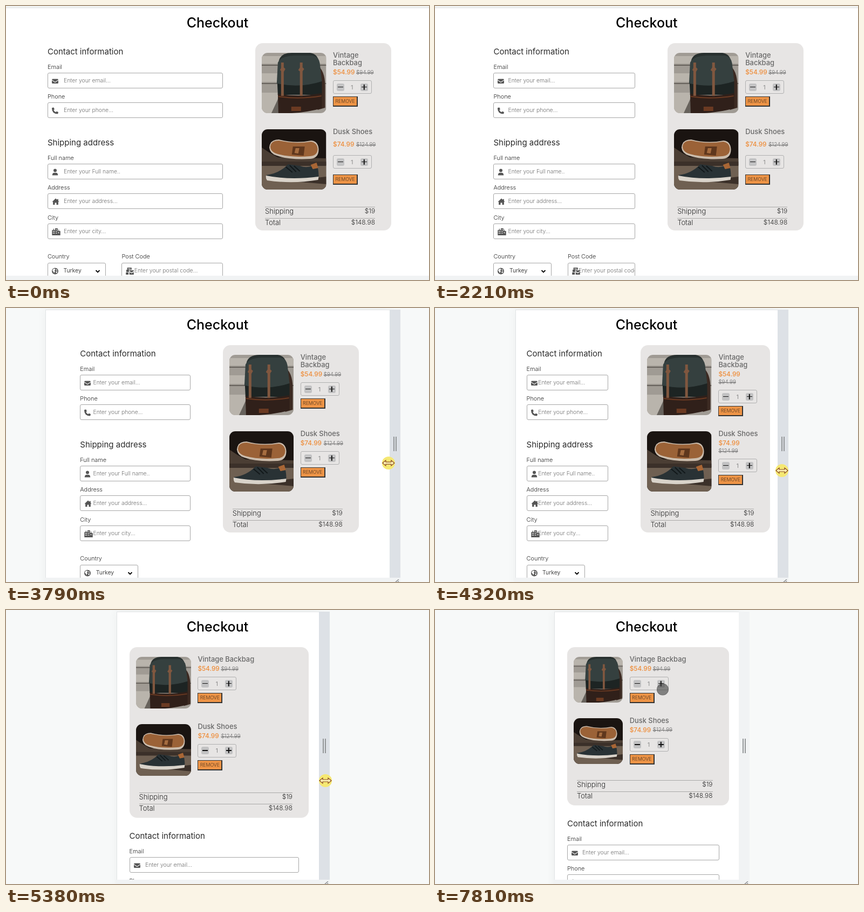
An HTML page that plays this animation: 784 by 509 pixels, repeating every 8000 ms.

```html
<!DOCTYPE html>
<html lang="en">
<head>
<meta charset="utf-8">
<title>Checkout</title>
<style>
html, body { margin: 0; width: 100%; height: 100%; overflow: hidden; }
body { background: #f7f9f9; font-family: Inter, "Open Sans", sans-serif; color: #2a2a2a; }
#stage { position: relative; width: 784px; height: 509px; overflow: hidden; background: #f7f9f9; }
#stage div, #stage svg { position: absolute; box-sizing: border-box; }
.t { white-space: nowrap; line-height: 20px; height: 20px; margin-top: -10px; }

#page { left: var(--l); width: var(--w); top: 3px; height: 520px; background: #fff;
  border: solid #e1e4e5; border-width: 1px 0 0 1px; box-shadow: 0 0 16px rgba(60,70,70,.06); }
#title { left: calc(var(--cx) - 100px); top: 30.5px; width: 200px; text-align: center;
  font-size: 25px; font-weight: 450; color: #000; }

#form { left: var(--fx); top: var(--fy); width: var(--fw); height: 0; }
.head { font-size: 15px; font-weight: 400; }
.label { font-size: 10.9px; font-weight: 350; }
.input { height: 29px; border: 1px solid #a6a6a6; border-radius: 3px; background: #fff; overflow: hidden; }
.input svg { left: 7px; top: 8px; fill: #555; }
.hint { left: calc(13.4px + 4.84%); top: 14px; font-size: 10.4px; font-weight: 300; color: #707070; }
.hint.value { left: 28.5px; font-weight: 400; color: #444; }
.wrapped .post { display: none; }

#card { left: var(--kx); top: 69px; width: var(--kw); height: var(--kh); background: #e7e5e4; border-radius: 14px; }
.item { left: 12px; top: 0; }
.item svg.photo { left: 0; top: 18px; width: var(--iw); height: var(--ih); border-radius: 11px; }
.info { left: calc(var(--iw) + 12.5px); top: 0; }
.name { top: 23px; font-size: 12.9px; font-weight: 450; color: #686868; }
.name.two { display: none; top: 37px; }
.price { top: calc(40px + var(--a)); font-size: 11.8px; font-weight: 450; color: #ee8d3a; }
.old { left: var(--ox); top: calc(40.8px + var(--a) + var(--o)); font-size: 9.8px; font-weight: 350; color: #6b6b6b; text-decoration: line-through; }
.qty { top: calc(55px + var(--a) + var(--o) + var(--b)); width: 72px; height: 25px; border: 1px solid #b0b0b0; border-radius: 3px; }
.qty .t { left: 32px; top: 11.5px; font-size: 11px; color: #8a8a8a; }
.btn { top: 4.5px; width: 14px; height: 14px; border-radius: 3px; background: #c2c2c3; }
.btn::before, .btn.plus::after { content: ""; position: absolute; left: 2px; top: 6.2px; width: 10px; height: 1.6px; background: #111; }
.btn.plus::after { transform: rotate(90deg); }
.remove { top: calc(85px + var(--a) + var(--o) + var(--c)); width: 46px; height: 19px; background: #ee9446; color: #4a3320;
  border: solid #333; border-width: 1px 2px 2px 1px; font-size: 8.8px; font-weight: 350; line-height: 16px; text-align: center; }
.sum { left: 18px; right: 30px; height: 20px; border-top: 1px solid #a9a8a7; }
.sum .t { top: 7px; font-size: 13px; font-weight: 350; }
.sum .t + .t { right: 0; font-size: 11.9px; }

#bar { left: var(--r); top: 3px; width: 20px; height: 499px; background: #dde1e6; }
#bar.idle { background: #f1f3f4; }
#bar::before { content: ""; position: absolute; left: 7px; top: 236px; width: 2px; height: 27px;
  border: solid #949799; border-width: 0 2px; }
#foot { left: var(--l); top: 501px; width: calc(var(--w) + 20px); height: 8px; background: #f1f3f4; }
#foot svg { right: 2px; top: 3px; }
#cursor { left: 0; top: 0; width: 24px; height: 24px; margin: -12px; border-radius: 50%; background: #f5e873; }
#cursor.press { background: #f6c988; }
#cursor.touch { width: 22px; height: 22px; margin: -11px; background: rgba(62,62,62,.6); box-shadow: inset 0 0 0 1px rgba(70,70,70,.25); }
#cursor.touch svg { display: none; }
</style>
</head>
<body>
<svg width="0" height="0" style="position:absolute">
  <symbol id="mail" viewBox="0 0 16 16"><path d="M2 2.5h12q2 0 2 2L8 10 0 4.500q0-2 2-2zM0 6.200l8 5.500 8-5.500V12q0 2-2 2H2q-2 0-2-2z"/></symbol>
  <symbol id="phone" viewBox="0 0 16 16"><path d="M1 .8 4.600 0 6.500 4.500 4.300 6.300q1.800 3.600 5.400 5.400l1.800-2.200L16 11.400 15.200 15q-.2 1-1.200 1Q0 15.500 0 2q0-1 1-1.200z"/></symbol>
  <symbol id="user" viewBox="0 0 16 16"><circle cx="8" cy="4" r="4"/><path d="M1 16q0-6.500 5-6.500h4q5 0 5 6.500z"/></symbol>
  <symbol id="home" viewBox="0 0 16 16"><path d="M8 .5 11.500 3.700V2H14v4l2 2.200h-2V15H9.800v-4.500H6.200V15H2V8.200H0z"/></symbol>
  <symbol id="city" viewBox="0 0 19 16"><path fill-rule="evenodd" d="M0 4h3V1h1.500v3H7V0h6v6h1.500V3H16v3h3v10H0zM2 6v2h2V6zm0 4v2h2v-2zm3-4v2h1.500V6zm0 4v2h1.500v-2zM9 2v2h2V2zm0 4v2h2V6zm0 4v2h2v-2zm5-1v2h2V9z"/></symbol>
  <symbol id="globe" viewBox="0 0 16 16"><circle cx="8" cy="8" r="8"/><path fill="#fff" d="M3 3l4-1.500L9 4 6.500 6 8 8.500 6 11v3L3.500 9 1.500 7zM11 3l3 3-2 1-2-2zM10 9l4-.5-2 4.500-2-1z"/></symbol>
  <symbol id="bulk" viewBox="0 0 18 16"><path fill-rule="evenodd" d="M3 0h10v5H7v5H1V5h2zM5 2v1.500h6V2zM8 6h10v2l-5 3-5-3zm0 4 5 3 5-3v6H8zM0 11h6v5H0z"/></symbol>
  <symbol id="bag" viewBox="0 0 120 112" preserveAspectRatio="none">
    <path fill="#a09b94" d="M0 0h120v112H0z"/>
    <path fill="#b9b4ac" d="M0 6h120v14H0zM0 38h36v16H0zM0 74h32l-8 38H0z"/>
    <path fill="#67625c" d="M0 22h120v2H0zM0 56h120v2H0zM18 112l14-30v30z"/>
    <path fill="#3c2a22" d="M102 22q16 10 16 40v40l-14 4z"/>
    <path fill="#28302f" d="M32 14Q36 0 56 0h34q14 2 16 16l5 62H30z"/>
    <path fill="#35403f" d="M30 18Q36 6 60 5l34 0q12 2 14 14l4 34q-40 14-84 4z"/>
    <path fill="#1d2423" d="M29 57q42 9 83-4l0 25H30z"/>
    <path fill="#30201a" d="M30 76q40 7 82-1v28q-40 11-81 9z"/>
    <path fill="#6b3a22" d="M31 80q38 6 80-1v2q-42 7-80 1zM55 100h18v8H55z"/>
    <path fill="#80573f" d="M36 18h5v62h-5zM71 18h5v62h-5zM38 24l6 6-4 7-6-5zM73 24l6 6-5 7-6-5z"/>
  </symbol>
  <symbol id="shoes" viewBox="0 0 120 112" preserveAspectRatio="none">
    <path fill="#1a1411" d="M0 0h120v112H0z"/>
    <path fill="#4b3e34" d="M0 34q14 10 30 18l90 2v12H0z"/>
    <path fill="#6f6052" d="M0 64h120v48H0z"/>
    <path fill="#3b3029" d="M0 60h120v8H0zM50 96l70-8v14z"/>
    <path fill="#cbbcac" d="M14 34Q15 19 32 19q30 8 60 2 13 1 14 16 0 17-16 18Q50 57 28 49 15 45 14 34z"/>
    <path fill="#9b6237" d="M16 32q1-11 16-11 30 7 60 2 11 2 12 13 0 13-14 14-36 3-60-4-14-4-14-14z"/>
    <path fill="#5f371d" d="M58 32l22 0-2 17-22-2z"/><path fill="#a66d40" d="M63 35l7 0-2 10-7-1z"/>
    <path fill="#293235" d="M9 85q24-3 40-20l22 3q16 6 30-4 5 6 5 26-50 10-97 3z"/>
    <path fill="#a96635" d="M91 66l11-4 3 10-10 2z"/>
    <path fill="#d9d3ca" d="M8 86q44 9 98 2l-1 6q-48 8-95 1-3-4-2-9z"/>
    <path fill="none" stroke="#12181a" stroke-width="2" d="M45 70l12 10M52 67l12 12M60 68l11 10"/>
  </symbol>
</svg>
<div id="stage">
  <div id="page"></div>
  <div id="title" class="t">Checkout</div>
  <div id="form"></div>
  <div id="card"></div>
  <div id="bar"></div>
  <div id="foot"><svg width="9" height="6"><path d="M1 6 8 0M5 6l3-2.500" stroke="#85888a" stroke-width="1.300"/></svg></div>
  <div id="cursor"><svg width="24" height="24"><path d="M1 12 7 7v3h10V7l6 5-6 5v-3H7v3z" fill="#fff3b4" stroke="#8a4a22" stroke-width="1.200"/></svg></div>
</div>
<script>
const LOOP = 8000, MID = 392;
const $ = id => document.getElementById(id);
const stage = $('stage'), bar = $('bar'), cursor = $('cursor');

const text = (cls, y, str) => `<div class="t ${cls}" style="top:${y}px">${str}</div>`;
const icon = (id, w = 12) => `<svg width="${w}" height="13"><use href="#${id}"/></svg>`;
const field = (y, label, id, hint, w) => text('label', y, label) +
  `<div class="input" style="top:${y + 11.5}px;width:100%">${icon(id, w)}<div class="t hint">${hint}</div></div>`;

$('form').innerHTML =
  text('head', 84.5, 'Contact information') +
  field(112.5, 'Email', 'mail', 'Enter your email...') +
  field(167.5, 'Phone', 'phone', 'Enter your phone...') +
  text('head', 253.5, 'Shipping address') +
  field(281.5, 'Full name', 'user', 'Enter your Full name..') +
  field(336.5, 'Address', 'home', 'Enter your address...', 14) +
  field(392.5, 'City', 'city', 'Enter your city...', 16) +
  text('label', 464.5, 'Country') +
  `<div class="input" style="top:477px;width:108px">${icon('globe')}<div class="t hint value">Turkey</div>
   <svg style="left:87px;top:11px" width="10" height="8"><path d="M1.500 2 5 5.500 8.500 2" fill="none" stroke="#000" stroke-width="1.800"/></svg></div>` +
  `<div class="post" style="left:137.5px;width:calc(100% - 137.5px)">${field(465, 'Post Code', 'bulk', 'Enter your postal code...', 15)}</div>`;

const item = (photo, [one, two], price, old) => `<div class="item">
  <svg class="photo"><use href="#${photo}"/></svg>
  <div class="info">
    <div class="t name">${one}</div><div class="t name two">${two}</div>
    <div class="t price">${price}</div><div class="t old">${old}</div>
    <div class="qty"><div class="btn" style="left:6px"></div><div class="t">1</div><div class="btn plus" style="left:50px"></div></div>
    <div class="remove">REMOVE</div>
  </div></div>`;
const sum = (label, value) => `<div class="sum"><div class="t">${label}</div><div class="t">${value}</div></div>`;

$('card').innerHTML =
  item('bag', ['Vintage', 'Backbag'], '$54.99', '$94.99') +
  item('shoes', ['Dusk Shoes', ''], '$74.99', '$124.99') +
  sum('Shipping', '$19') + sum('Total', '$148.98');

const [bagItem, shoeItem] = document.querySelectorAll('.item');
const [shipRow, totalRow] = document.querySelectorAll('.sum');
const [bagName, bagTwo] = bagItem.querySelectorAll('.name');

// Keys are [time, value]; a repeated time makes a hard change.
const WIDTH = [[0, 1016], [1680, 1016], [1680, 1010], [2270, 800], [2600, 800], [2600, 770], [2870, 753],
  [3260, 712], [3590, 712], [3590, 702], [3790, 639], [4320, 487], [4390, 477], [4910, 477], [4910, 468],
  [5380, 375], [5840, 375], [5840, 368], [6240, 342]];
const CENTER = [[0, 392], [1680, 392], [1680, 395], [2270, 392], [2810, 392], [2870, 383], [2930, 392]];
const CURSOR_X = [[2600, 783], [2870, 768], [3260, 736], [3590, 736], [3790, 709], [4320, 643], [4390, 641],
  [4910, 641], [5380, 592], [5840, 592], [6240, 575], [6720, 575], [7000, 488], [7470, 409], [7540, 413], [7810, 422]];
const CURSOR_Y = [[2600, 276], [2870, 278], [3790, 288], [4320, 302], [4910, 304], [5380, 317], [6720, 317],
  [7000, 262], [7470, 137], [7540, 131], [7810, 147.5]];

function at(keys, t) {
  const i = keys.findIndex(k => k[0] > t);
  if (i < 0) return keys[keys.length - 1][1];
  if (i === 0) return keys[0][1];
  const [t0, v0] = keys[i - 1], [t1, v1] = keys[i];
  return v0 + (v1 - v0) * (t - t0) / (t1 - t0);
}

function setVars(el, vars) {
  for (const k in vars) el.style.setProperty('--' + k, vars[k] + 'px');
}

function layout(t) {
  const w = at(WIDTH, t), cx = at(CENTER, t), l = MID - w / 2, r = MID + w / 2;
  const stacked = t >= 4450;
  let fx, fw, fy = 0, kx, kw, kh = 348, iw = 119.5, ih = 112, step = 142;
  if (stacked) {
    fx = kx = l + 24;
    kw = w - 42.5;
    fw = w - 60.5;
    iw = 0.338 * kw - 10;
    ih = iw - 6;
    step = ih + 28.4;
    kh = 2 * step + 67;
    fy = Math.round(kh + 18);
  } else {
    kw = Math.min(252, 0.493 * w);
    fw = Math.min(0.32 * w, 0.928 * w - 60 - kw);
    fx = cx + 3.5 - (fw + 60 + kw) / 2;
    kx = fx + fw + 60;
  }
  const roomy = fw >= 260 && !stacked;
  const oldBelow = !stacked && kw < 247;
  setVars(stage, { l, r, w, cx, fx, fy, fw, kx, kw, kh, iw, ih, ox: oldBelow ? 0 : 43, o: oldBelow ? 14 : 0 });
  setVars(bagItem, { a: stacked ? 0 : 14, b: 0, c: 0 });
  setVars(shoeItem, { a: roomy ? 6 : 0, b: roomy ? 5 : 0, c: roomy ? 11 : 0 });
  stage.classList.toggle('wrapped', !roomy);
  bagName.textContent = stacked ? 'Vintage Backbag' : 'Vintage';
  bagTwo.style.display = stacked ? 'none' : 'block';
  shoeItem.style.top = step + 'px';
  const line = 20 + 2 * step;
  shipRow.style.top = line + 'px';
  totalRow.style.top = line + 21 + 'px';
  return r;
}

function pointer(t, edge) {
  const x = at(CURSOR_X, t), y = at(CURSOR_Y, t);
  const inPage = t > 6720 && x < edge;
  cursor.style.display = t < 2600 ? 'none' : 'block';
  cursor.style.transform = `translate(${x}px, ${y}px)`;
  cursor.className = t < 2930 ? 'press' : inPage ? 'touch' : '';
  bar.classList.toggle('idle', inPage);
}

const start = performance.now();
function frame() {
  const t = (performance.now() - start) % LOOP;
  pointer(t, layout(t));
  requestAnimationFrame(frame);
}
frame();
</script>
</body>
</html>
```
